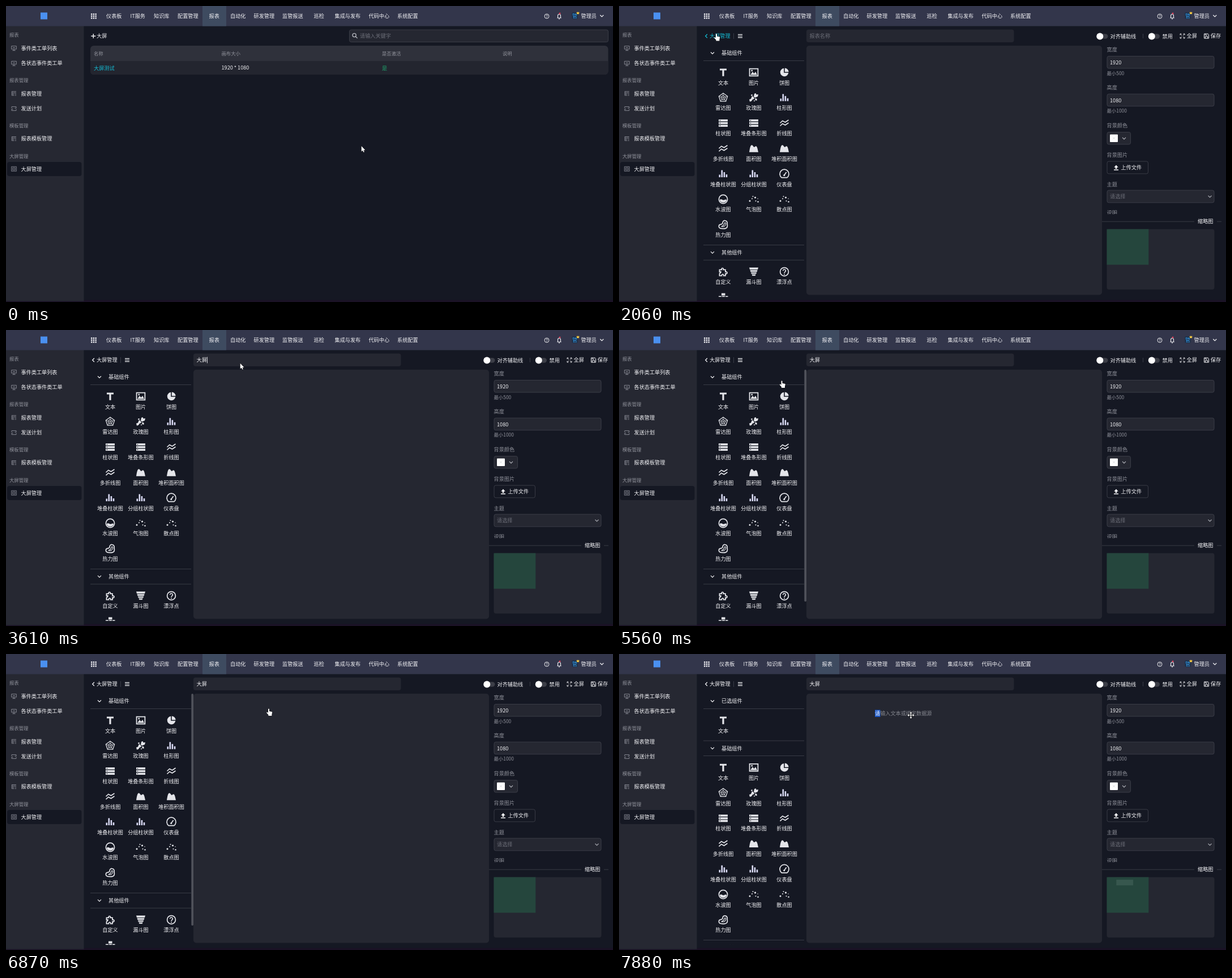
An HTML page for the animation above (8000 ms loop, 1072 px wide and 522 px high).

```html
<!DOCTYPE html>
<html lang="zh">
<head>
<meta charset="utf-8">
<style>
html, body { margin: 0; width: 100%; height: 100%; overflow: hidden; background: #151823; }
svg { display: block; width: 1072px; height: 522px; font-family: "Noto Sans CJK SC", "Noto Sans CJK", sans-serif; }
.s { fill: none; stroke: currentColor; stroke-width: 1.5; }
.f { fill: currentColor; }
.d { fill: #151823; }
</style>
</head>
<body>
<svg id="stage" viewBox="0 0 1072 522" xmlns="http://www.w3.org/2000/svg"></svg>
<script>
const WHITE = '#f2f2f5', LABEL = '#90929b', HINT = '#6c6e78', CYAN = '#14bad2',
  PANEL = '#252731', EDGE = '#42454f', BACK = '#151823';

const text = (x, y, s, color = WHITE, size = 9.15, extra = '') =>
  `<text x="${x}" y="${y + size * .37}" font-size="${size}" fill="${color}" ${extra}>${s}</text>`;
const small = (x, y, s) => text(x, y, s, LABEL, 8.4);
const rect = (x, y, x2, y2, fill, r = 0, extra = '') =>
  `<rect x="${x}" y="${y}" width="${x2 - x}" height="${y2 - y}" fill="${fill}" rx="${r}" ${extra}/>`;
const field = (x, y, x2, y2, fill = PANEL) => rect(x + .5, y + .5, x2 - .5, y2 - .5, fill, 3, `stroke="${EDGE}" stroke-width=".8"`);
const hline = (x, x2, y) => rect(x, y, x2, y + .8, '#41444e');
const at = (x, y, body, color = WHITE) => `<g transform="translate(${x} ${y})" color="${color}">${body}</g>`;
const fill = d => `<path class="f" d="${d}"/>`;
const line = (d, w = 1.5) => `<path class="s" style="stroke-width:${w}" d="${d}"/>`;
const dot = (x, y, r, c = 'f') => `<circle class="${c}" cx="${x}" cy="${y}" r="${r}"/>`;
const down = line('M-3-1.5L0 1.5L3-1.5', 1.2);
const group = (id, body, extra = '') => `<g id="${id}" ${extra}>${body}</g>`;

const pentagon = r => 'M' + [0, 1, 2, 3, 4].map(i =>
  `${(r * Math.sin(i * 1.2566)).toFixed(2)} ${(-r * Math.cos(i * 1.2566)).toFixed(2)}`).join('L') + 'Z';
const spokes = [0, 1, 2, 3, 4].map(i => `M0 0L${8 * Math.sin(i * 1.2566)} ${-8 * Math.cos(i * 1.2566)}`).join('');
const bars = `<g color="#d9daf4">${fill('M-7.5 1.5h2.6v4.5h-2.6ZM-3.5-6.5h2.6v12.5h-2.6ZM.6-3h2.6v9h-2.6ZM4.7 1h2.6v5h-2.6Z')}</g>`;
const rows = fill('M-8-6.5H8v3.6H-8ZM-8-1.8H8v3.6H-8ZM-8 2.9H8v3.6H-8Z') +
  '<path class="d" d="M-6.3-5.3h1.4v1.2h-1.4ZM-6.3-.6h1.4v1.2h-1.4ZM-6.3 4.1h1.4v1.2h-1.4Z"/>';
const zigzag = line('M-7.5 0L-3.2-4L1.5-1.5L7.5-5.5M-7.5 5L-3.2 1L1.5 3.5L7.5-.5', 1.7);
const hill = fill('M-8 6.5C-7 0-6-6-3.4-6C-1.5-6-.6-2.4.8-2.4C2-2.4 2.4-4.2 4-4C6.2-3.6 7 2 8 6.5Z');
const scatter = [[-7, 3, 1.5], [-3, -1, 1], [-1.5, -5, 1], [2.5, -3, 1.6], [3.5, 3, 1], [7.5, 4.5, 1.2], [7, -1, .7]]
  .map(p => dot(...p)).join('');
const ICON = {
  T: fill('M-6-6.5H6V-3.4H1.6V6.8H-1.6V-3.4H-6Z'),
  image: line('M-7.4-6.3H7.4V6.3H-7.4Z', 1.8) + fill('M-6 4.5L-2.2-1L.6 2L3.2-1L6 4.5Z') + dot(-3.3, -3, 1.4),
  pie: fill('M-.8-7.3A7.3 7.3 0 1 0 7.3.8H-.8Z') + fill('M.8-7.6A7.3 7.3 0 0 1 7.6-.8H.8Z'),
  radar: line(pentagon(8), 1.3) + line(pentagon(4.2), 1) + line(spokes, .7),
  rose: fill('M1-7L3.5-8L4.5-5.5L8-6L7-2L4.5-1L2 0L0-2ZM-3-3L0-1L1 2L-2 3L-4 6L-7 7L-8 3L-5 2ZM2 1L5 1.5L6 4.5L3 5Z') + dot(-3.5, -4.5, 1.3) + dot(1, 5.5, 1),
  bars, rows, zigzag, hill, scatter,
  gauge: line('M-4.8 6.6A8 8 0 1 1 4.8 6.6Z', 1.7) + line('M-.3 2.5L3.6-3', 1.7) + dot(-.3, 2.5, 1.5),
  water: line('M-7.6 0A7.6 7.6 0 1 1 7.6 0A7.6 7.6 0 1 1-7.6 0Z', 1.7) + fill('M-6 1C-3-1.8-1.5 2.6 1.5 1.4C3.5.4 4.5 0 6 1C5.5 7.5-5.5 7.5-6 1Z'),
  heat: line('M-1-3C-1-9 7.5-8 7.2-2C7 1 8 2 7 4.5C5 8.5-1 7-4 6.8C-9 6-8.5 0-4.5-.4C-2.5-.6-1-1.5-1-3Z', 1.7) +
    line('M-3 3.2C-1 2 1.5 2 1.8-1.5C2-4 5-4 4.6-1C4 3 1 4.5-3 3.2Z', 1.2),
  puzzle: line('M-6.5-3.5H-2.8C-4-7.4 1.4-7.4.4-3.5H4V.2C8-.8 8 4.4 4 3.4V7H.8C1.4 3.6-3.2 3.6-2.6 7H-6.5V3.4C-3-.2-3-.2-6.5.2Z', 1.8),
  funnel: fill('M-8-7.5H8L7-4H-7ZM-6.6-3H6.6L5.6 0H-5.6ZM-5.2 1H5.2L4.2 3.6H-4.2ZM-3.6 4.6H3.6L2.6 7H-2.6Z'),
  help: line('M-7.4 0A7.4 7.4 0 1 1 7.4 0A7.4 7.4 0 1 1-7.4 0Z', 1.7) + line('M-2.4-1.6C-2.4-5 2.6-4.8 2.4-1.6C2.2.2 0 .2 0 2.2', 1.5) + dot(0, 4.2, 1),
  bricks: fill('M-3-7h6.5v4h-6.5ZM-8-2h5v3.8h-5ZM-2-2h5v3.8h-5ZM4-2h4.5v3.8h-4.5Z')
};

const item = (i, top, name, icon) => {
  const x = 184 + i % 3 * 54, y = top + Math.floor(i / 3) * 44.75;
  return at(x, y, ICON[icon], '#e4e5ea') + text(x, y + 18.2, name, WHITE, 9.15, 'text-anchor="middle"');
};
const section = (y, title, items) => at(165, y, down) + text(181, y, title) + hline(149, 327, y + 13) +
  items.split(' ').map((s, i) => item(i, y + 34, ...s.split(':'))).join('');

function shell() {
  const nav = [['仪表板', 177], ['IT服务', 219.5], ['知识库', 261], ['配置管理', 303], ['报表', 358.5], ['自动化', 396], ['研发管理', 437.5],
    ['监管报送', 488], ['巡检', 543.5], ['集成与发布', 580.5], ['代码中心', 640.5], ['系统配置', 691]];
  const easel = line('M-4.3-3.6H4.3V1.8H-4.3ZM0 1.8V4.2M-2.6 4.2H2.6M-2-.8H2', 1);
  const sheet = line('M-4-3.5H4M-4-1.2H4M-4 1.1H.6M-4 3.4H.6M2 1.1H4M2 3.4H4M-3.6-3.5V3.4', 1);
  const plan = line('M-4-.8V-3.4H4V-.8L1.5-.8M4 .8V3.4H-4V.8L-1.5.8', 1);
  const screen = line('M-4.4-4H4.4V4H-4.4ZM-2.4-2H2.4V2H-2.4ZM-1 0H1', .9);
  const menu = [[74.3, easel, '事件类工单列表'], [101, easel, '各状态事件类工单'], [154.3, sheet, '报表管理'],
    [181, plan, '发送计划'], [234, sheet, '报表模板管理'], [287.3, screen, '大屏管理']];
  let s = rect(0, 0, 1072, 522, BACK) + rect(0, 518.5, 1072, 522, '#1b1226') + rect(0, 35, 137.5, 520.5, '#262832') +
    rect(0, 0, 1072, 35.5, '#33364b') + rect(347, 0, 389, 35.5, '#3e4b60') +
    rect(61, 11.5, 73, 23.5, '#4a90f0');
  for (let i = 0; i < 9; i++) s += at(150 + i % 3 * 3.7, 13.2 + Math.floor(i / 3) * 3.5, fill('M0 0h2.4v2.4h-2.4Z'));
  s += nav.map(([n, x]) => text(x, 17.5, n)).join('');
  s += at(955, 18, `<g transform="scale(.54)">${ICON.help}</g>`);
  s += at(977, 18, line('M-3.6 3H3.6M-2.5 3V-.6C-2.5-4.4 2.5-4.4 2.5-.6V3M-1 4.6H1', 1.1)) + `<circle cx="978" cy="13" r="1.5" fill="#e0405a"/>`;
  s += rect(999, 11, 1010, 23, '#203049', 3) + text(1000, 17.5, '管', '#2f9be8', 9) +
    at(1010, 12.2, fill('M-2.6-1.8L-1-.6L0-2.4L1-.6L2.6-1.8L1.8 2H-1.8Z'), '#f2c744');
  s += text(1015.5, 17.5, '管理员') + at(1052.3, 17.5, down);
  s += rect(2, 275, 133.5, 300, BACK, 4);
  s += [['报表', 51], ['报表管理', 131], ['模板管理', 211], ['大屏管理', 264.5]].map(([n, y]) => small(6, y, n)).join('');
  return s + menu.map(([y, icon, n]) => at(14, y, icon, '#858791') + text(26.5, y, n)).join('');
}

function listPage() {
  return group('add', at(154.3, 53, fill('M-4-.7H-.7V-4H.7V-.7H4V.7H.7V4H-.7V.7H-4Z'), 'inherit') + text(160, 53, '大屏', 'currentColor')) +
    field(606, 41.5, 1064, 64) + at(616, 52.3, line('M-4-.8A3.1 3.1 0 1 1 2.2-.8A3.1 3.1 0 1 1-4-.8ZM1.4 1.4L4.6 4.6', 1.3), '#b4b6bd') +
    text(625, 53, '请输入关键字', HINT) +
    rect(149, 70, 1063.5, 121, '#2f313b', 6) +
    '<path id="row" d="M149 97H1063.5V115a6 6 0 0 1-6 6H155a6 6 0 0 1-6-6Z"/>' +
    [['名称', 155], ['画布大小', 380.5], ['是否激活', 664], ['说明', 877]].map(([n, x]) => small(x, 84, n)).join('') +
    text(155, 109.5, '大屏测试', CYAN) + text(380.5, 109, '1920 * 1080') + text(664, 109.5, '是', '#1fa26c');
}

function editPage() {
  const toggle = x => rect(x + 1, 49.3, x + 20.5, 57.7, '#3c3e47', 4.2) + `<circle cx="${x + 6.3}" cy="53.5" r="6" fill="#fff"/>`;
  const basic = '文本:T 图片:image 饼图:pie 雷达图:radar 玫瑰图:rose 柱形图:bars 柱状图:rows 堆叠条形图:rows 折线图:zigzag 多折线图:zigzag ' +
    '面积图:hill 堆积面积图:hill 堆叠柱状图:bars 分组柱状图:bars 仪表盘:gauge 水波图:water 气泡图:scatter 散点图:scatter 热力图:heat';
  let s = group('back', at(154.3, 53, line('M1.6-3.2L-1.6 0L1.6 3.2', 1.3), 'inherit') + text(160, 53, '大屏管理', 'currentColor')) +
    rect(202, 48, 202.8, 58, EDGE) + at(214, 53, line('M-4-2.6H4M-4 0H4M-4 2.6H4', 1.2)) +
    rect(331, 41.5, 697.5, 64, PANEL, 4) +
    group('hint', text(336.5, 53, '报表名称', HINT)) + group('name', text(336.5, 53, '大屏')) +
    rect(0, 47.5, .9, 58.5, WHITE, 0, 'id="caret"') +
    toggle(843) + text(867.5, 53.5, '对齐辅助线') + rect(925, 49, 925.8, 57, EDGE) +
    toggle(934.5) + text(959.5, 53.5, '禁用') +
    at(995, 53, line('M-4-1.6V-4H-1.6M1.6-4H4V-1.6M4 1.6V4H1.6M-1.6 4H-4V1.6M-3.6-3.6L-1-1M3.6-3.6L1-1M3.6 3.6L1 1M-3.6 3.6L-1 1', .9)) + text(1002.5, 53, '全屏') +
    at(1037.5, 53, line('M-4-4H2.6L4-2.6V4H-4ZM-2 4V.6H2V4M-2-4V-1.8H1.4', 1)) + text(1044.8, 53, '保存');
  s += `<g clip-path="url(#side)">` +
    group('chosen', section(83, '已选组件', '文本:T') + hline(149, 327, 152.6)) +
    group('parts', section(83, '基础组件', basic) + hline(149, 327, 421) +
      section(434.7, '其他组件', '自定义:puzzle 漏斗图:funnel 漂浮点:help 堆叠块:bricks')) + '</g>';
  s += rect(331, 70, 853, 509.5, PANEL, 5) + rect(327.3, 70, 331, 479, '#50525a', 1.8, 'id="bar"') +
    group('box', rect(452, 98.5, 461.5, 111, '#1a57c8') + text(452, 105, '<tspan fill="#fff">请</tspan>输入文本或绑定数据源', '#85878f'));
  s += [['宽度', 77], ['高度', 143.7], ['背景颜色', 210.5], ['背景图片', 263], ['主题', 314.2]].map(([n, y]) => text(861.5, y, n, LABEL)).join('') +
    [['1920', 88, '最小500'], ['1080', 154.7, '最小1000']].map(([n, y, m]) =>
      field(861.5, y, 1051.5, y + 22.5) + text(867, y + 11.8, n) + small(861.5, y + 30.5, m)).join('') +
    field(861.5, 222, 904, 244.5) + rect(867, 226.5, 881, 240, '#fff', 1) + at(874, 233.2, line('M-2-2L2 2M2-2L-2 2', .6), '#c4c6cc') +
    at(892, 233.3, down, '#b4b6bd') + field(861.5, 273.5, 935, 296.3, BACK) +
    at(878, 285, fill('M0-4.6L3.8-.6H1.4V2.2H-1.4V-.6H-3.8ZM-4 3.2H4V4.8H-4Z')) + text(886.5, 285, '上传文件') +
    field(861.5, 324.5, 1051.5, 347.3) + text(867, 336, '请选择', HINT) + at(1043.5, 336, down, '#a4a6ae') +
    `<g clip-path="url(#form)">${text(861.5, 365, '说明', LABEL)}</g>` +
    hline(853, 1016, 379.7) + hline(1056, 1064, 379.7) + text(1022, 379.3, '缩略图') +
    rect(861.5, 393.5, 1051.5, 500, PANEL, 4) + rect(861.5, 393.5, 935.3, 456.3, '#25463d') +
    rect(878.3, 398, 908, 408, '#37574e', 0, 'id="thumb"');
  return s;
}

const shape = (id, d, w = .6) => `<path id="${id}" d="${d}" fill="#fff" stroke="#000" stroke-width="${w}" paint-order="stroke"/>`;
const pointer = shape('arrow', 'M0 0V9.8L2.2 7.8L3.7 11L5.2 10.3L3.8 7.2H6.8Z') +
  shape('hand', 'M-1 1C-1-.4 1-.4 1 1V4.4L5.2 5.2C6 5.4 6.4 6 6.2 6.8L5.4 10V12.4H-.6V10.8L-3.6 7.4C-4.2 6.2-3 5.4-2.2 6.2L-1 7.2Z', .8) +
  shape('beam', 'M-2-5H2V-4.4H.4V4.4H2V5H-2V4.4H-.4V-4.4H-2Z', .2) +
  shape('move', 'M0-6L2.2-3.4H.6V-.6H3.4V-2.2L6 0L3.4 2.2V.6H.6V3.4H2.2L0 6L-2.2 3.4H-.6V.6H-3.4V2.2L-6 0L-3.4-2.2V-.6H-.6V-3.4H-2.2Z', .9);

document.getElementById('stage').innerHTML =
  '<clipPath id="side"><path d="M149 70H331V513H149Z"/></clipPath><clipPath id="form"><path d="M853 350H1072V367H853Z"/></clipPath>' +
  shell() + group('list', listPage()) + group('edit', editPage()) + group('cursor', pointer);

const $ = id => document.getElementById(id);
const show = (id, on) => $(id).style.display = on ? '' : 'none';

// start, end, steps, x, y
const moves = [
  [490, 1270, 11, 183.7, 53.7], [1360, 1510, 3, 174, 50], [1740, 1830, 2, 172, 49], [2140, 2660, 8, 409, 55],
  [2830, 2830, 1, 413.7, 58.7], [5320, 5320, 1, 394, 64], [5490, 5490, 1, 340, 77], [5560, 5560, 1, 287.5, 89.5],
  [5640, 6260, 9, 186, 118], [6640, 6870, 4, 464, 96.5], [6950, 7420, 7, 538, 89], [7650, 7880, 4, 515.5, 108]
];
function place(t) {
  let x = 627.7, y = 247;
  for (const [a, b, n, x2, y2] of moves) {
    if (t < a) break;
    const k = t >= b ? 1 : (Math.floor((t - a) / (b - a) * (n - 1)) + 1) / n;
    const e = 1 - (1 - k) ** 2;
    x += (x2 - x) * e;
    y += (y2 - y) * e;
  }
  return [x, y];
}

function draw(t) {
  const [x, y] = place(t), editing = t >= 2060, typed = t >= 3530, dropped = t >= 7030;
  show('list', !editing);
  show('edit', editing);
  $('add').style.color = t >= 1360 && x < 181 ? CYAN : WHITE;
  $('row').style.fill = y > 97 && y < 121 ? '#2a2c37' : '#23252f';
  $('back').style.color = x < 198 && y < 60 ? CYAN : WHITE;
  show('hint', !typed);
  show('name', typed);
  show('caret', [[2660, 3210], [3530, 4160], [4690, 5240]].some(([a, b]) => t >= a && t < b));
  $('caret').setAttribute('x', typed ? 354.9 : 337);
  show('bar', t >= 5490 && !dropped);
  for (const id of ['chosen', 'box', 'thumb']) show(id, dropped);
  $('parts').setAttribute('transform', `translate(0 ${dropped ? 83.2 : 0})`);
  const kind = dropped ? 'move' : t >= 5490 || t >= 1360 && x < 181 ? 'hand' : editing && !typed && x > 331 ? 'beam' : 'arrow';
  for (const id of ['arrow', 'hand', 'beam', 'move']) show(id, id === kind);
  $('cursor').setAttribute('transform', `translate(${x} ${y})`);
}

const begin = performance.now();
function tick() {
  draw((performance.now() - begin) % 8000);
  requestAnimationFrame(tick);
}
tick();
</script>
</body>
</html>
```
